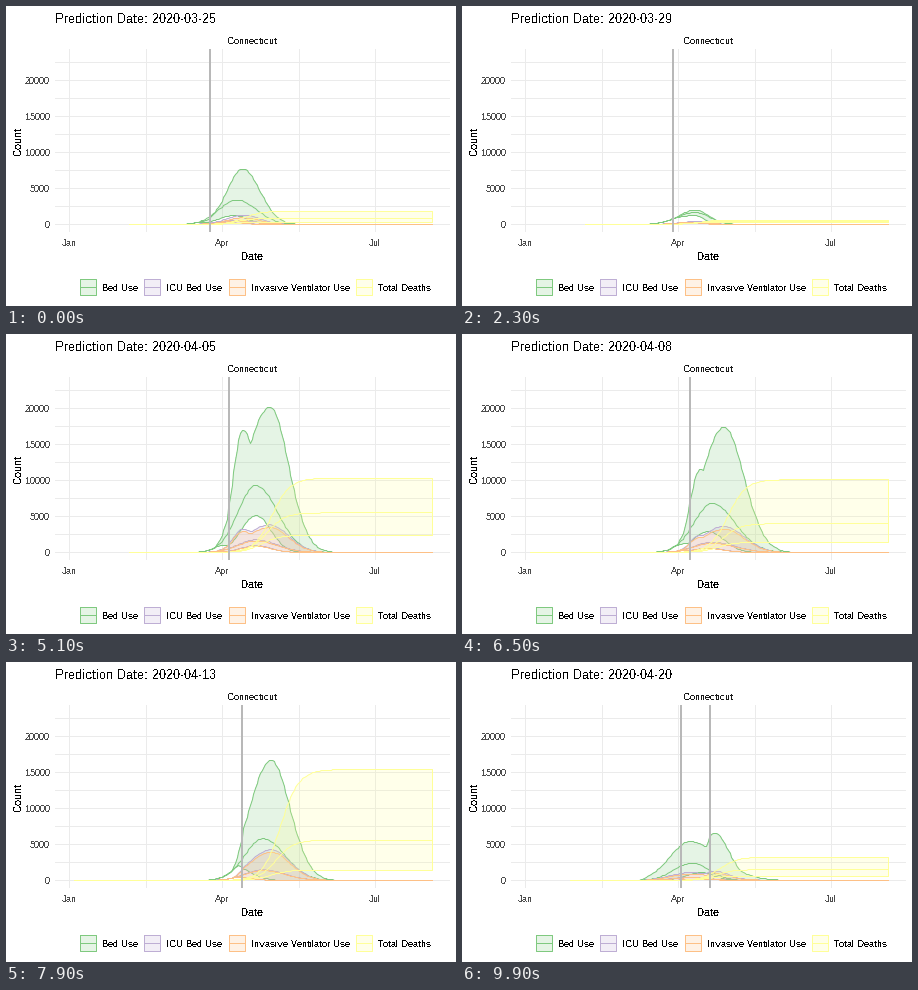
Write a matplotlib script that moves like this. It is 450 px wide and 300 px high and loops after 10 s.

```python
import matplotlib.pyplot as plt
import numpy as np
from matplotlib.animation import FuncAnimation
from matplotlib.patches import Polygon, Rectangle

W, H, FRAMES, STEP = 450, 300, 100, 100
PX_DAY = 306 / 182          # Jan 1 sits at x = 63, Jul 1 at x = 369
LAST_DAY = 216
GROUPS = [("Bed Use", "#7FC97F", 74), ("ICU Bed Use", "#BEAED4", 138),
          ("Invasive Ventilator Use", "#FDC086", 223),
          ("Total Deaths", "#FFFF99", 350)]

plt.rcParams.update({"font.family": "Liberation Sans", "text.hinting": "default",
                     "text.hinting_factor": 1, "text.antialiased": False,
                     "path.simplify": False})


def day_x(day):
    return 63 + day * PX_DAY


def count_y(count):
    return 218.5 - 0.0072 * count


def snap(v):
    return np.round(v - 0.5) + 0.5


def hump(x, peak, height, left, right):
    spread = np.where(x < peak, left, right)
    return height * np.exp(-0.5 * ((x - peak) / spread) ** 2)


def forecast(start, split, icu, vent, high, mid, low, deaths, centre):
    """Rows of x and, per group, the upper, middle and lower curves.

    high is a list of humps whose envelope is the upper curve; mid and low
    are a peak position and height. All three part from each other at split.
    """
    x = day_x(np.arange(start, LAST_DAY + 1))
    tail = high[-1][3]
    top = np.max([hump(x, *h) for h in high], axis=0)
    mean = hump(x, *mid, 18, 1.15 * tail)
    floor = hump(x, *low, 15, 0.8 * tail)
    fan = np.clip((x - split) / 12, 0, 1)
    bed = np.array([mean + (c - mean) * fan for c in (top, mean, floor)])
    dead = np.array([d / (1 + np.exp((centre - 5 * i - x) / 9))
                     for i, d in enumerate(deaths)])
    return x, np.array([bed, bed * icu, bed * vent, dead])


def blend(a, b, t):
    """Match points by order; points without a partner stay until the end."""
    (ax_, ay), (bx, by) = a, b
    n = min(len(ax_), len(bx))
    x = ax_[:n] + (bx[:n] - ax_[:n]) * t
    y = ay[..., :n] + (by[..., :n] - ay[..., :n]) * t
    rest = ax_ > x[-1] + 0.1
    return np.append(x, ax_[rest]), np.concatenate([y, ay[..., rest]], axis=2)


def between(a, b):
    return blend(a, b, 0.5)


early = forecast(36, 190, 0.17, 0.12, [(237, 7700, 16, 17)],
                 (231, 3400), (228, 1250), (1850, 900, 300), 238)
dip = forecast(36, 212, 0.2, 0.17, [(234, 2000, 18, 13)],
               (233, 1650), (231, 1300), (620, 450, 300), 238)
regrow = forecast(36, 213, 0.16, 0.13, [(242, 5600, 18, 23)],
                  (240, 4000), (228, 2000), (1350, 1100, 400), 245)
surge = forecast(36, 210, 0.19, 0.17,
                 [(237, 17000, 10, 16), (264, 20200, 25, 18.6)],
                 (250, 9300), (250, 5100), (10300, 5500, 2400), 266)
crest = forecast(3, 214, 0.207, 0.185,
                 [(238, 11500, 10, 20), (262, 17400, 22, 20)],
                 (250, 6800), (246, 2900), (10100, 4000, 1450), 266)
slope = forecast(3, 226, 0.257, 0.235, [(265, 16700, 21, 19)],
                 (257, 5800), (230, 1800), (15400, 5600, 1450), 275)
late = forecast(3, 234, 0.22, 0.18, [(257, 9000, 20, 20)],
                (251, 4000), (238, 1800), (6000, 2700, 1200), 264)
# Shape passed through while the last forecast returns to the first one.
fading = forecast(27, 175, 0.2, 0.16, [(228, 5400, 20, 30), (252, 6600, 9, 15)],
                  (230, 2400), (240, 1100), (3250, 1500, 600), 258)

STATES = [early, early, early, dip, between(dip, regrow), regrow,
          between(regrow, surge), surge, surge, crest, between(crest, slope),
          slope, between(slope, late), late]
DAYS = [84, 85, 86, 88, 89, 90, 91, 95, 97, 98, 100, 103, 107, 110]
ARRIVE = [0, 6, 15, *range(23, FRAMES + 1, 7)]


def date_text(day):
    month, dom = (3, day - 59) if day < 91 else (4, day - 90)
    return f"Prediction Date: 2020-{month:02}-{dom:02}"


def pose(frame):
    k = max(i for i, a in enumerate(ARRIVE[:-1]) if a <= frame)
    nxt = (k + 1) % len(STATES)
    steps = 4 if k == 2 else 3
    t = max(0, frame - ARRIVE[k + 1] + steps) / steps
    marks = [day_x(DAYS[k] + (DAYS[nxt] - DAYS[k]) * t)]
    if t == 0:
        return k, marks, STATES[k]
    if nxt == 0:
        marks.append(day_x(DAYS[k]))
        return k, marks, blend(STATES[k], fading, 1.5 * t)
    return k, marks, blend(STATES[k], STATES[nxt], t)


fig = plt.figure(figsize=(W / 100, H / 100), dpi=100, facecolor="white")
ax = fig.add_axes([0, 0, 1, 1])
ax.set(xlim=(0, W), ylim=(H, 0))
ax.axis("off")


def label(x, y, s, size=9, color="black", **kw):
    return ax.text(x, y, s, fontsize=size * 0.72, color=color, **kw)


def box(x, y, w, h, color, z, alpha=1):
    return ax.add_patch(Rectangle((x, y), w, h, fc=color, lw=0, alpha=alpha,
                                  antialiased=False, zorder=z))


def stroke(x, y, color, z):
    return ax.plot(x, y, color=color, lw=0.72, zorder=z, snap=False,
                   solid_joinstyle="round")[0]


for gx in (63, 140, 216, 293, 369):
    box(gx, 43, 1, 183, "#EBEBEB", 0)
for v in range(0, 22501, 2500):
    box(49, round(count_y(v) - 0.5), 395, 1, "#EBEBEB", 0)
    if v % 5000 == 0:
        label(44, count_y(v) + 3.5, str(v), color="#4D4D4D", ha="right")
for gx, month in ((63, "Jan"), (216, "Apr"), (369, "Jul")):
    label(gx, 240, month, color="#4D4D4D", ha="center")
label(246, 38, "Connecticut", color="#1A1A1A", ha="center")
label(246, 254, "Date", 11, ha="center")
label(12, 135, "Count", 11, rotation=90, ha="center", va="center")
title = label(49, 17, "", 13)

fills, edges, means = [], [], []
for i, (name, color, kx) in enumerate(GROUPS):
    left, right, top, bottom = kx + 0.5, kx + 16.5, 273.5, 289.5
    box(kx, 273, 17, 17, color, 1, alpha=0.2)
    stroke([left, right, right, left, left],
           [top, top, bottom, bottom, top], color, 2)
    stroke([left, right], [281.5, 281.5], color, 2)
    label(kx + 22, 285, name)
    area = Polygon([(0, 0), (1, 0), (1, 1)], fc=color, alpha=0.2, lw=0,
                   antialiased=False, zorder=3 + i)
    fills.append(ax.add_patch(area))
    edges.append(stroke([], [], color, 3.3 + i))
    means.append(stroke([], [], color, 3.6 + i))
bars = [box(0, 43, 2, 183, "#B8B8B8", 9) for _ in range(2)]


def draw(frame):
    k, marks, (x, y) = pose(frame)
    title.set_text(date_text(DAYS[k]))
    x, y = snap(x), snap(count_y(y))
    around = np.concatenate([x, x[::-1], x[:1]])
    for fill, edge, mean, (top, mid, low) in zip(fills, edges, means, y):
        outline = np.concatenate([top, low[::-1], top[:1]])
        fill.set_xy(np.column_stack([around, outline]))
        edge.set_data(around, outline)
        mean.set_data(x, mid)
    for i, bar in enumerate(bars):
        bar.set_visible(i < len(marks))
        if i < len(marks):
            bar.set_x(round(marks[i]) - 1)
    return [title, *fills, *edges, *means, *bars]


anim = FuncAnimation(fig, draw, frames=FRAMES, interval=STEP, repeat=True,
                     repeat_delay=0, blit=False)
plt.show()
```
